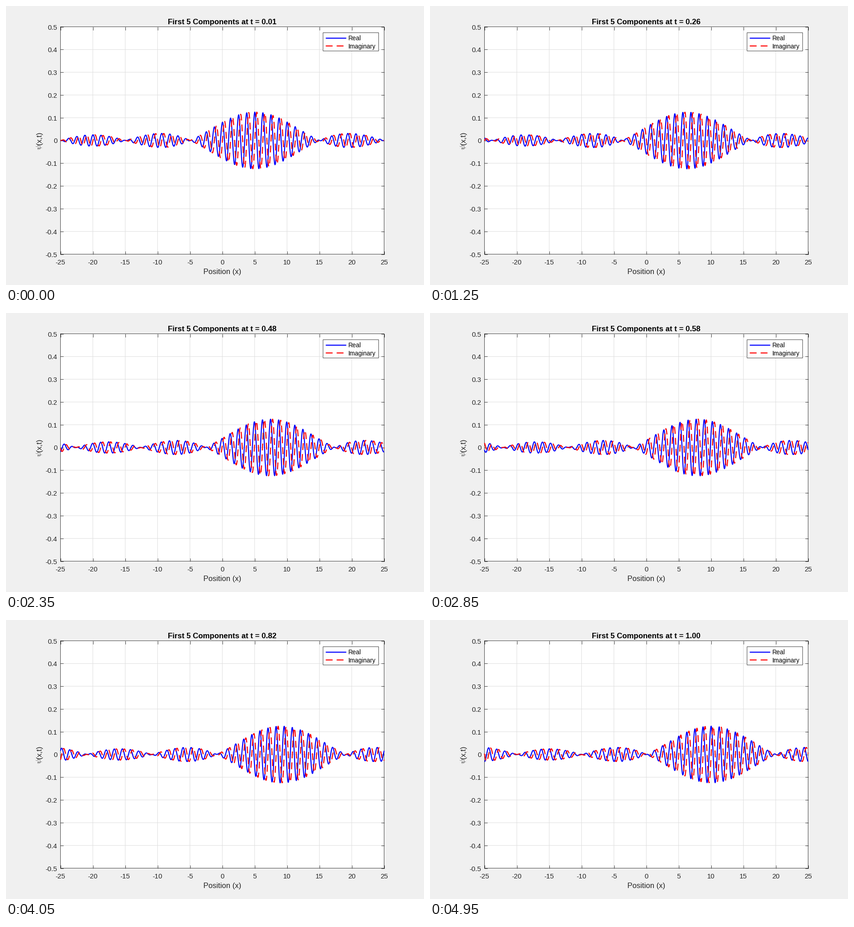
Animation, 917 px wide and 611 px high, one loop 5000 ms. Source, as a matplotlib script:

```python
import numpy as np
import matplotlib.pyplot as plt
from matplotlib.animation import FuncAnimation
from matplotlib.patches import Rectangle

W, H, DPI = 917, 611, 100
LEFT, RIGHT, TOP, BOTTOM = 119.5, 829.5, 45.5, 543.5
FRAMES, INTERVAL, DT = 100, 50, 0.01

INK = "#262626"
EDGE_PX = 0.85
LINE_PX = 2.25
DASH = (15 / LINE_PX, 8.9 / LINE_PX)

BOX = 50.0         # length of the periodic domain
CENTER = 5.0       # start of the wave packet
MODES = np.arange(38, 43)
AMPLITUDE = 0.025  # weight of each plane wave

plt.rcParams["font.family"] = "Liberation Sans"
plt.rcParams["path.snap"] = False


def pt(px):
    return px * 72 / DPI


def psi(x, t):
    """Sum of five free plane waves."""
    k = 2 * np.pi * MODES[:, None] / BOX
    return AMPLITUDE * np.exp(1j * (k * (x - CENTER) - k**2 * t / 2)).sum(axis=0)


fig = plt.figure(figsize=(W / DPI, H / DPI), dpi=DPI, facecolor="#f0f0f0")

# Plot area
ax = fig.add_axes([LEFT / W, 1 - BOTTOM / H, (RIGHT - LEFT) / W, (BOTTOM - TOP) / H])
ax.set(xlim=(-25, 25), ylim=(-0.5, 0.5), facecolor="white")
ax.set_xticks(np.arange(-25, 26, 5))
ax.set_yticks(np.arange(-5, 6) / 10)
ax.set_axisbelow(True)
ax.grid(color="#dedede", linewidth=pt(1))
ax.tick_params(direction="in", length=pt(7), width=pt(EDGE_PX), color=INK,
               top=True, right=True, labelbottom=False, labelleft=False)
for spine in ax.spines.values():
    spine.set(color=INK, linewidth=pt(EDGE_PX))

# Overlay in pixel coordinates for text and legend
page = fig.add_axes([0, 0, 1, 1], zorder=5)
page.set(xlim=(0, W), ylim=(H, 0))
page.axis("off")


def label(x, y, text, size, ha="center", color=INK, **kw):
    return page.text(x, y, text, fontsize=pt(size), ha=ha, va="baseline",
                     color=color, **kw)


for i in range(11):
    label(LEFT + (RIGHT - LEFT) * i / 10, 565.5, f"{5 * i - 25}", 15)
    label(112.5, BOTTOM - (BOTTOM - TOP) * i / 10 + 6,
          f"{(i - 5) / 10:g}", 15, ha="right")

title = label(474.5, 40, "", 16.77, color="black", weight="bold")
label(474.5, 586.5, "Position (x)", 16.5)
upright = dict(ha="left", rotation=90, rotation_mode="anchor")
label(77.5, 315, r"$\psi$", 16.5, math_fontfamily="cm", **upright)
label(77.5, 303.5, "(x,t)", 16.5, **upright)

# Legend
page.add_patch(Rectangle((695.5, 58.5), 122, 40, facecolor="white",
                         edgecolor=INK, linewidth=pt(EDGE_PX)))
solid = dict(color="#0000ff", linewidth=pt(LINE_PX), solid_capstyle="butt")
dashed = dict(color="#ff0000", linewidth=pt(LINE_PX), dashes=DASH,
              dash_capstyle="butt")
page.plot([701.5, 746.5], [70.5, 70.5], **solid)
page.plot([701.5, 746.5], [87.5, 87.5], **dashed)
label(751, 75, "Real", 13.6, ha="left", color="black")
label(751, 92.5, "Imaginary", 13.6, ha="left", color="black")

# Curves
x = np.linspace(-25, 25, 1000)
real, = ax.plot(x, 0 * x, clip_on=False, zorder=3, **solid)
imag, = ax.plot(x, 0 * x, clip_on=False, zorder=4, **dashed)


def update(i):
    t = (i + 1) * DT
    wave = psi(x, t)
    real.set_ydata(wave.real)
    imag.set_ydata(wave.imag)
    title.set_text(f"First 5 Components at t = {t:.2f}")
    return real, imag, title


anim = FuncAnimation(fig, update, frames=FRAMES, interval=INTERVAL, repeat=True)
plt.show()
```
